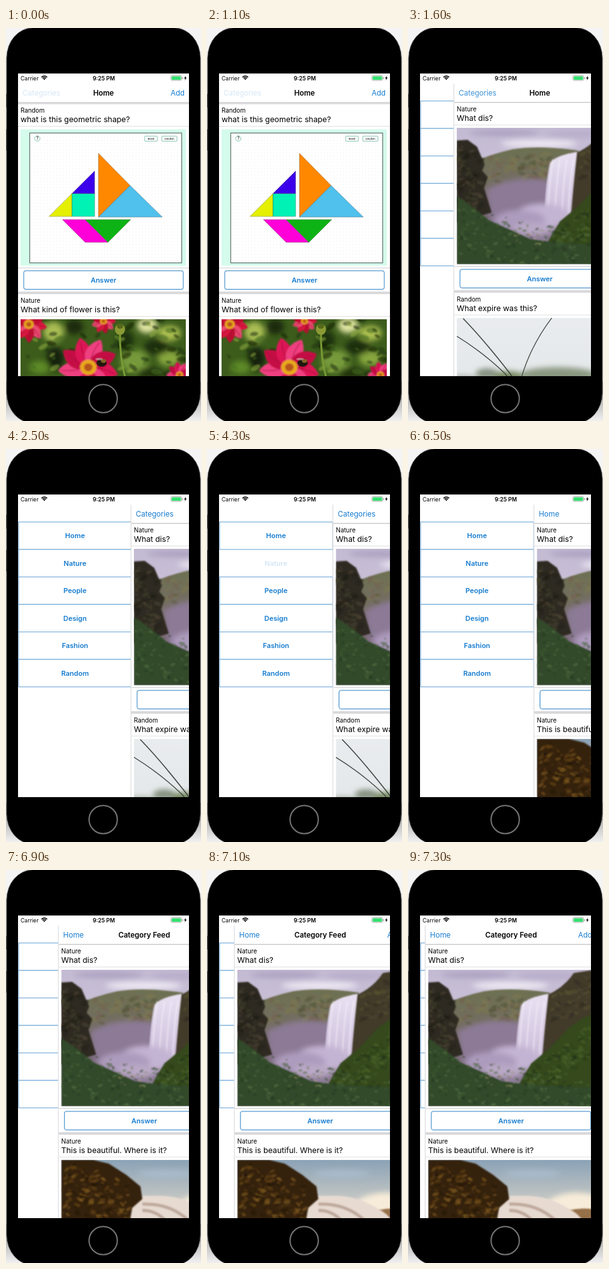
These frames come from a looping animation (308 by 622 pixels, 7.4 s). An HTML page:

```html
<!DOCTYPE html>
<html lang="en">
<head>
<meta charset="utf-8">
<title>Quiz feed</title>
<style>
html, body { margin: 0; width: 100%; height: 100%; overflow: hidden; background: #f4f4f4; }
svg { display: block; }
#stage { width: 308px; height: 622px; }
text { font-family: Inter, "Liberation Sans", sans-serif; fill: #000; white-space: pre; }
.blue { fill: #167ccf; }
.b { font-weight: 600; }
.mid { text-anchor: middle; }
</style>
</head>
<body>
<svg id="stage" viewBox="0 0 308 622"></svg>
<script>
const LOOP = 7400, STEP = 100, OPEN = 180.5;
const BLUE = '#2a80c4';

const rect = (x, y, w, h, fill, more = '') =>
  `<rect x="${x}" y="${y}" width="${w}" height="${h}" fill="${fill}" ${more}/>`;
const poly = (pts, fill, more = '') => `<polygon points="${pts}" fill="${fill}" ${more}/>`;
const path = (d, fill, more = '') => `<path d="${d}" fill="${fill}" ${more}/>`;
const oval = (x, y, rx, ry, fill, more = '') =>
  `<ellipse cx="${x}" cy="${y}" rx="${rx}" ry="${ry}" fill="${fill}" ${more}/>`;
const text = (x, y, size, str, cls = '', more = '') =>
  `<text x="${x}" y="${y}" font-size="${size}" class="${cls}" ${more}>${str}</text>`;
const fade = (id, a, b, dir = 'x2="0" y2="1"') =>
  `<linearGradient id="${id}" ${dir}><stop stop-color="${a}"/><stop offset="1" stop-color="${b}"/></linearGradient>`;
const blur = (id, r) => `<filter id="${id}" x="-30%" y="-30%" width="160%" height="160%">` +
  `<feGaussianBlur stdDeviation="${r}"/></filter>`;
const soft = (body, id = 'soft') => `<g filter="url(#${id})">${body}</g>`;

function randomizer(seed) {
  return () => (seed = (seed * 16807) % 2147483647) / 2147483647;
}

// Scatters small soft specks along a slanted band.
function leaves(seed, n, [x, y, w, h], slope, colors, size = 4) {
  const rnd = randomizer(seed);
  let out = '';
  for (let i = 0; i < n; i++) {
    const u = rnd(), px = x + u * w, py = y + slope * u + rnd() * h;
    const r = size * (0.4 + rnd() * 0.7), a = rnd() * 90 - 45;
    out += oval(px.toFixed(1), py.toFixed(1), r.toFixed(1), (r * 0.5).toFixed(1),
      colors[i % colors.length],
      `opacity=".55" transform="rotate(${a.toFixed()} ${px.toFixed(1)} ${py.toFixed(1)})"`);
  }
  return soft(out, 'haze');
}

function tangram() {
  const line = 'stroke="#333" stroke-opacity=".45" stroke-width=".7"';
  const pieces = [
    ['123,38 123,139 173,89', '#ff8800'],
    ['173,89 224,139 123,139', '#50c0ec'],
    ['117,66 117,102 81,102', '#3d00ea'],
    ['81,102 117,102 117,138 81,138', '#00f2b4'],
    ['81,102 81,138 45,138', '#e4f000'],
    ['66,143 102,143 138,179 102,179', '#ff00d8'],
    ['102,143 174,143 138,179', '#0db314']
  ];
  const button = (x, w, label) =>
    rect(x, 11, w, 8, '#fff', 'rx="1" stroke="#67b39f" stroke-width=".8"') +
    text(x + w / 2, 16.5, 4, label, 'mid');
  return rect(0, 0, 261, 216, '#d4fbec') +
    rect(14.5, 6, 240, 205.5, '#fff') +
    rect(14.5, 6, 240, 205.5, 'url(#dots)', 'stroke="#62706b" stroke-width="1.2"') +
    `<circle cx="26.5" cy="14.8" r="4.2" fill="#fff" stroke="#67b39f" stroke-width=".8"/>` +
    text(26.5, 17.3, 7, '?', 'mid') +
    button(196, 20, 'Reset') + button(223, 24, 'Solution') +
    pieces.map(([p, c]) => poly(p, c, line)).join('');
}

function bloom(x, y, size, turn, colors) {
  let out = '';
  for (let i = 0; i < 9; i++) {
    out += path(`M0 0C${size * .25} ${-size * .4} ${size * .7} ${-size * .38} ${size} 0` +
      `C${size * .7} ${size * .32} ${size * .25} ${size * .3} 0 0Z`, colors[i % colors.length],
      `transform="rotate(${turn + i * 40})"`) +
      path(`M${size * .2} 0Q${size * .5} ${-size * .1} ${size * .9} 0`, 'none',
        `transform="rotate(${turn + i * 40})" stroke="#a3083a" stroke-width="1.2" opacity=".7"`);
  }
  return `<g transform="translate(${x} ${y})" filter="url(#haze)">${out}` +
    oval(0, 0, size * .27, size * .25, '#e9a91a') +
    oval(0, 0, size * .14, size * .13, '#b8541a') + '</g>';
}

function flowers() {
  const pink = ['#dc1555', '#ee3f80', '#c50b44'], red = ['#d8183e', '#ea4a70', '#bd0c30'];
  const glow = [[52, 20, 16, 16, '#a8bc52'], [200, 10, 16, 12, '#dfe3a0'], [235, 22, 18, 12, '#a9bd50'],
    [180, 66, 22, 18, '#76993a'], [235, 62, 18, 12, '#86a63e'], [30, 76, 16, 10, '#5d8a26'],
    [85, 12, 14, 12, '#1a2b0b'], [215, 44, 20, 12, '#1c2f0c'], [55, 62, 14, 18, '#15240a'],
    [165, 34, 14, 16, '#1d310d'], [205, 86, 20, 10, '#20350f']];
  return rect(0, 0, 261, 216, '#3c5c1c') +
    soft(glow.map(g => oval(...g)).join('')) +
    leaves(31, 70, [0, 0, 261, 92], 0, ['#8fac40', '#14230a', '#45691d', '#1d320e'], 8) +
    path('M157 18Q156 60 166 95', 'none', 'stroke="#7a9a35" stroke-width="3"') +
    oval(157, 16, 8, 9, '#8a9a34') + oval(157, 11, 5, 4, '#55681c') +
    bloom(13, 8, 29, 10, red) + bloom(131, 3, 20, 0, red) +
    bloom(251, 88, 21, 20, pink) +
    bloom(107, 76, 48, 14, pink) +
    oval(128, 69, 8, 6, '#21180f') + oval(131, 66, 4, 3, '#8a6426') +
    oval(124, 63, 6, 2, '#c9b9b0', 'opacity=".6"');
}

function waterfall() {
  return rect(0, 0, 261, 216, 'url(#lilac)') +
    soft(oval(75, 8, 55, 5, '#aca1c0') + oval(130, 25, 60, 6, '#eee9f3') + oval(190, 10, 50, 6, '#b9aecb')) +
    path('M25 54Q60 40 88 34Q130 27 192 36L192 150L30 150Z', 'url(#hill)', 'filter="url(#haze)"') +
    leaves(7, 70, [46, 48, 100, 40], -8, ['#7b7850', '#57583a', '#74604f'], 7) +
    soft(path('M46 98Q90 72 150 84L165 185L60 185Z', '#8c7a96')) +
    path('M188 40Q215 28 230 5L261 0L261 140L176 150Z', '#433b2b', 'filter="url(#haze)"') +
    leaves(11, 60, [196, 40, 65, 50], -34, ['#57522f', '#302b1f', '#4f4332'], 6) +
    path('M190 38Q155 44 147 56Q140 90 138 145L180 143Q184 90 190 38Z', 'url(#fall)', 'filter="url(#haze)"') +
    soft([152, 163, 174, 184].map(x =>
      path(`M${x} 50Q${x - 6} 85 ${x - 8} 135`, 'none', 'stroke="#f6f2fb" stroke-opacity=".6" stroke-width="2"')
    ).join(''), 'haze') +
    soft(oval(134, 140, 42, 20, '#c4b4d3') + oval(100, 146, 40, 16, '#ad9bbd') + oval(120, 160, 32, 10, '#b9a9c6')) +
    path('M0 20L17 19L32 30L44 58L40 68L49 78L43 95L55 134L0 150Z', '#2f2a20', 'filter="url(#haze)"') +
    leaves(17, 75, [0, 26, 38, 95], 16, ['#4d4433', '#1e1b14', '#40402a'], 6) +
    path('M145 178L163 148L192 124L222 92L245 76L261 70L261 216L140 210Z', '#34481f', 'filter="url(#haze)"') +
    leaves(23, 130, [160, 162, 101, 50], -80, ['#4d6429', '#24351a', '#3f5724'], 5) +
    path('M0 108Q28 126 50 146Q90 164 116 176Q165 184 261 186L261 216L0 216Z', '#31482a', 'filter="url(#haze)"') +
    leaves(29, 210, [0, 126, 261, 72], 50, ['#47653a', '#20331e', '#3c5a30', '#577344'], 4) +
    leaves(41, 18, [92, 162, 46, 22], 0, ['#b09a74', '#8a8c5c'], 2.5);
}

function cliff() {
  return rect(0, 0, 261, 104, 'url(#dawn)') +
    soft(oval(235, 76, 50, 24, '#f7ecd9') + oval(165, 22, 45, 6, '#a9bccb')) +
    path('M208 84Q235 74 261 78L261 216L208 216Z', '#957049', 'filter="url(#haze)"') +
    soft(path('M118 58Q165 54 190 62Q212 70 230 82Q245 92 250 110L100 110Z', '#e6dad1') +
      path('M128 70Q175 68 205 100M128 80Q155 80 170 104', 'none', 'stroke="#bfa99c" stroke-width="5"'), 'haze') +
    path('M0 0L50 0L75 6L103 24L125 42L128 62L112 76L106 110L0 110Z', '#35230f', 'filter="url(#haze)"') +
    leaves(53, 190, [2, 2, 106, 84], 30, ['#6b4816', '#1b1209', '#4a310f', '#8a6322'], 5);
}

function grass() {
  const blade = (d, w) => path(d, 'none', `stroke="#424843" stroke-width="${w}"`);
  return rect(0, 0, 261, 216, 'url(#fog)') +
    soft(oval(48, 88, 18, 8, '#84907f') + oval(82, 93, 24, 9, '#788a62') +
      oval(160, 90, 60, 12, '#8a9780') + oval(10, 100, 30, 9, '#aab4a7')) +
    blade('M10 1Q42 34 84 88Q92 100 98 110', 1.6) + blade('M0 29Q42 55 76 88L96 112', 1.4) +
    blade('M150 0Q112 50 98 110', 1.3);
}

function post(y, [category, title, photo]) {
  return `<g transform="translate(0 ${y})">` +
    text(4, 132.3, 9.8, category) + text(4, 147, 12.3, title) +
    rect(0, 153, 270, .8, '#dadada') +
    `<svg x="4" y="158" width="261" height="216">${photo()}</svg>` +
    rect(0, 377, 270, 1.2, '#d6d6d6') +
    rect(9, 382, 252, 29.4, '#fff', `rx="3" stroke="${BLUE}" stroke-width="1"`) +
    text(135, 400.8, 11, 'Answer', 'b mid blue') +
    rect(0, 415, 270, 4, '#d9d9dc') + '</g>';
}

function feed(id, left, title, posts, shift) {
  return `<g id="${id}">` + rect(0, 88, 270, 465, '#fff') +
    posts.map((p, i) => post(shift + i * 300.8, p)).join('') +
    rect(0, 117, 270, shift ? 3.6 : 1.4, shift ? '#d9d9dc' : '#c8c8c8') +
    text(7, 107, 11.6, left, 'blue', 'data-left') +
    text(135, 107, 11.5, title, 'b mid') + text(241, 107, 11.5, 'Add', 'blue') + '</g>';
}

function menu() {
  return ['Home', 'Nature', 'People', 'Design', 'Fashion', 'Random'].map((name, i) => {
    const y = 115.5 + i * 43.5;
    return `<g id="menu${name}">` +
      rect(20, y, 178.5, 43.5, '#fff', 'stroke="#6ba5d6" stroke-width="1"') +
      text(109, y + 25.8, 11, name, 'b mid blue') + '</g>';
  }).join('');
}

function statusBar() {
  const arc = r => `M${60.5 - r * .75} ${82.3 - r * .7}A${r} ${r} 0 0 1 ${60.5 + r * .75} ${82.3 - r * .7}`;
  return rect(19, 72, 270, 16, '#fff') +
    text(23, 82.6, 8.7, 'Carrier') +
    path(arc(6) + arc(3.6), 'none', 'stroke="#000" stroke-width="1.5"') +
    path('M60.5 82.5L58.9 80.6Q60.5 79.4 62.1 80.6Z', '#000') +
    text(154.5, 82.6, 8.75, '9:25 PM', 'b mid') +
    rect(260.5, 75.5, 17, 7.5, '#fff', 'rx="2" stroke="#9b9b9b" stroke-width=".8"') +
    rect(261.6, 76.6, 14.8, 5.3, '#35e070', 'rx="1"') + rect(278.3, 78, 1.2, 2.6, '#9b9b9b') +
    path('M284 75.6L281.2 79.8H283L282.4 83L285.4 78.6H283.5Z', '#000');
}

function phone() {
  return rect(0, 0, 308, 622, '#f4f4f4') +
    rect(0, 560, 308, 62, 'url(#shade)') +
    rect(0, 104, 2, 22, '#222') + rect(0, 160, 2, 34, '#222') +
    rect(.8, -.5, 306.4, 626, '#000', 'rx="42" ry="48" stroke="#8a8a8a" stroke-width=".8"') +
    '<circle cx="153.5" cy="586.5" r="22.3" fill="#000" stroke="#777" stroke-width="2"/>';
}

const nature = ['Nature', 'What dis?', waterfall];
document.getElementById('stage').innerHTML = '<defs>' +
  fade('lilac', '#c3bad3', '#d9d0e0') + fade('hill', '#6d7150', '#7a6878') +
  fade('fall', '#e9e2f2', '#c9bad8') + fade('dawn', '#8ba2b6', '#eadfcd') + fade('fog', '#e9ecee', '#dde3e4') +
  fade('shade', '#8c8c8c', '#f0f0f0') +
  blur('soft', 4) + blur('haze', .8) +
  '<pattern id="dots" width="5" height="5" patternUnits="userSpaceOnUse">' +
  rect(2, 2, .8, .8, '#dedede') + '</pattern>' +
  '<clipPath id="screen">' + rect(19, 72, 270, 479, '#000') + '</clipPath></defs>' +
  phone() +
  '<g clip-path="url(#screen)">' + rect(19, 72, 270, 479, '#fff') + menu() +
  '<g id="panel">' + rect(-1.2, 88, 1.6, 465, '#dcdcde') +
  feed('start', 'Categories', 'Home', [
    ['Random', 'what is this geometric shape?', tangram],
    ['Nature', 'What kind of flower is this?', flowers]], 2.2) +
  feed('fresh', 'Categories', 'Home', [nature, ['Random', 'What expire was this?', grass]], 0) +
  feed('category', 'Home', 'Category Feed', [nature,
    ['Nature', 'This is beautiful. Where is it?', cliff]], 0) +
  '</g>' + statusBar() + '</g>';

const $ = id => document.getElementById(id);
const panel = $('panel'), feeds = ['start', 'fresh', 'category'].map($);
const lefts = feeds.map(f => f.querySelector('[data-left]'));
const clamp = v => Math.min(1, Math.max(0, v));

// Critically damped spring: share of the way still to go.
function rest(t, from) {
  const w = Math.max(0, t - from) * 0.00645;
  return (1 + w) * Math.exp(-w);
}

// Touch feedback: quick dim, slower recovery.
function touch(t, down, up) {
  return 1 - 0.82 * clamp((t - down) / 150) * (1 - clamp((t - up) / 250));
}

function draw(t) {
  const x = t < 6500 ? OPEN * (1 - rest(t, 1430)) : OPEN * rest(t, 6560);
  panel.setAttribute('transform', `translate(${(19 + x).toFixed(2)} 0)`);
  const shown = t < 1400 ? 0 : t < 4800 ? 1 : 2;
  feeds.forEach((f, i) => f.style.display = i === shown ? '' : 'none');
  lefts[0].style.opacity = lefts[1].style.opacity = touch(t, -200, 1400);
  $('menuNature').style.opacity = touch(t, 4000, 4600);
}

const began = performance.now();
let last = -1;
function tick(now) {
  const t = Math.floor((Math.max(0, now - began) % LOOP) / STEP) * STEP;
  if (t !== last) draw(last = t);
  requestAnimationFrame(tick);
}
draw(0);
requestAnimationFrame(tick);
</script>
</body>
</html>
```
